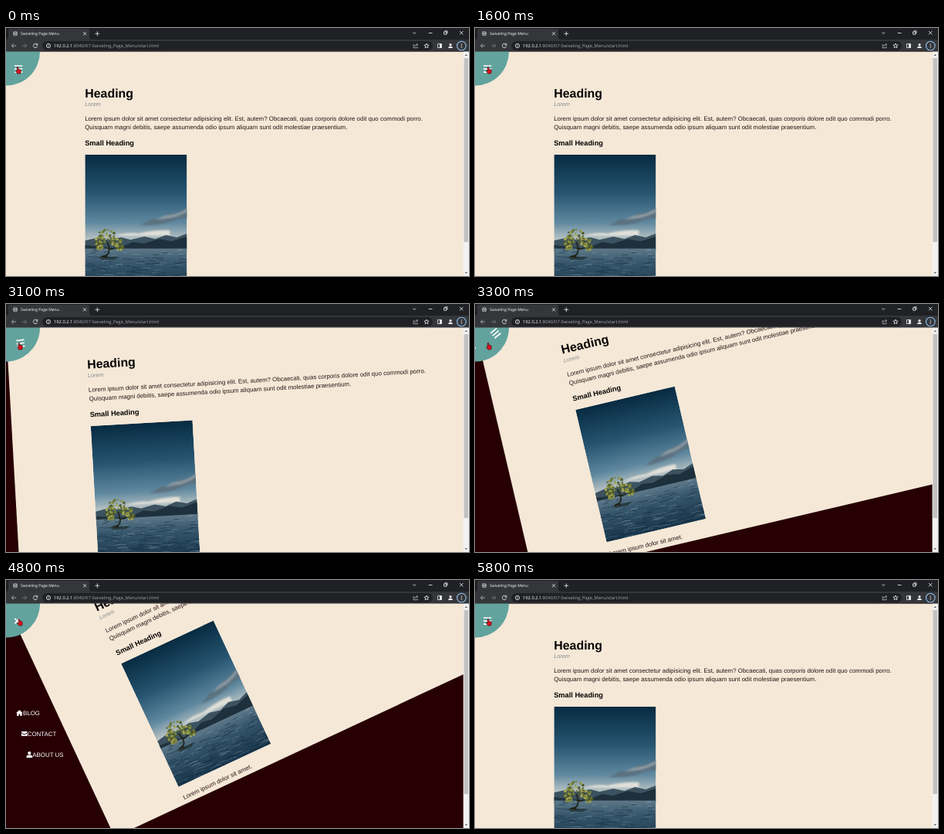
An HTML page for the animation above (5900 ms loop, 600 by 321 pixels).

```html
<!DOCTYPE html>
<html lang="en">
<head>
<meta charset="utf-8">
<title>Swiveling Page Menu</title>
<style>
  html, body { margin: 0; width: 100%; height: 100%; overflow: hidden; background: #270004; }
  svg { display: block; width: 600px; height: 321px; }
  text { font: 7.91px "Liberation Sans", Arial, sans-serif; text-rendering: geometricPrecision; white-space: pre; }
  .ui { font-family: "Open Sans", "Noto Sans", sans-serif; font-size: 5.75px; fill: #fff; }
  .line { fill: none; stroke: #e8eaed; stroke-width: .85; }
  .white { fill: none; stroke: #fff; stroke-width: 1.7; }
</style>
</head>
<body>
<svg viewBox="0 0 600 321">
  <defs>
    <linearGradient id="sky" x1="0" y1="0" x2="0" y2="1">
      <stop offset="0" stop-color="#072b41"/>
      <stop offset=".4" stop-color="#265470"/>
      <stop offset=".72" stop-color="#5f889f"/>
      <stop offset=".9" stop-color="#b9c3c4"/>
      <stop offset="1" stop-color="#cfcdc4"/>
    </linearGradient>
    <linearGradient id="lake" x1="0" y1="0" x2="0" y2="1">
      <stop offset="0" stop-color="#5d7889"/>
      <stop offset=".35" stop-color="#36566c"/>
      <stop offset="1" stop-color="#17354b"/>
    </linearGradient>
    <filter id="soft"><feGaussianBlur stdDeviation="1.2"/></filter>
    <clipPath id="frame"><path d="M0 0h132v176H0z"/></clipPath>
  </defs>

  <path fill="#270004" d="M0 30h600v291H0z"/>

  <g fill="#fff">
    <g class="item" data-reach="46">
      <path d="M13 172.3l4.4-4 4.4 4h-1.2v3.7h-2.3v-2.5h-1.8v2.5h-2.3v-3.7z"/>
      <text x="22" y="175">BLOG</text>
    </g>
    <g class="item" data-reach="66">
      <path d="M20 196h7.6v1.2l-3.8 2.6-3.8-2.6zM20 198.2l3.8 2.6 3.8-2.6v3.8H20z"/>
      <text x="27.7" y="202">CONTACT</text>
    </g>
    <g class="item" data-reach="76">
      <circle cx="30.3" cy="224" r="2.1"/>
      <path d="M26.4 230q0-3.4 2.6-3.4h2.6q2.6 0 2.6 3.4z"/>
      <text x="34.3" y="229">ABOUT US</text>
    </g>
  </g>

  <g id="page">
    <path fill="#f5e8d7" d="M0 30.6h593v333.4H0z"/>
    <text x="102.3" y="89.6" fill="#050303" style="font-size:15.9px;font-weight:bold">Heading</text>
    <text x="102.2" y="101" fill="#858b8e" style="font-size:7.3px;font-style:italic">Lorem</text>
    <g fill="#2a1214">
      <text x="102.2" y="119.8">Lorem ipsum dolor sit amet consectetur adipisicing elit. Est, autem? Obcaecati, quas corporis dolore odit quo commodi porro.</text>
      <text x="102.2" y="131.3">Quisquam magni debitis, saepe assumenda odio ipsum aliquam sunt odit molestiae praesentium.</text>
      <text x="102.2" y="358">Lorem ipsum dolor sit amet.</text>
    </g>
    <text x="102.2" y="152.3" fill="#050303" style="font-size:9.26px;font-weight:bold">Small Heading</text>
    <g transform="translate(102.4 164)" clip-path="url(#frame)">
      <path fill="url(#sky)" d="M0 0h132v122H0z"/>
      <g filter="url(#soft)">
        <path fill="#5c7280" d="M70 91q10-3 16-8 12 2 20-6 14-1 28-8v13q-14 0-24 5-12 5-40 4z"/>
        <path fill="#8c9aa2" d="M92 84q10-6 18-6t22-8v4q-14 7-22 8t-18 2z"/>
        <path fill="#e0dfd8" d="M34 106q18-6 36-4 20-5 40-4v7H34z"/>
      </g>
      <path fill="#3c5260" d="M0 111l14-3 16 2 17-3 12 3 18-4 14 3 14-5 14 3 13-5v24H0z"/>
      <path fill="#1e303c" d="M40 122l22-9 14 2 20-6 16 3 20-6v17H40z"/>
      <path fill="#22333c" d="M0 117l20 2 24 3H0z"/>
      <path fill="url(#lake)" d="M0 121.5h132V176H0z"/>
      <path id="glints" fill="none" stroke="#93aab8" stroke-width=".6" opacity=".5"/>
      <path id="ripples" fill="none" stroke="#0e2639" stroke-width="1" opacity=".5"/>
      <path fill="#1b2a26" opacity=".6" d="M17 132h26l-5 4H22z"/>
      <path fill="none" stroke="#20251a" stroke-width="1.8" d="M21 132q9-1 10-6t-2-13M29 121q8 3 13-3M29 132h-8"/>
      <g id="leaves"></g>
    </g>
  </g>

  <g id="dial">
    <circle cy="30.6" r="44" fill="#62a39e"/>
    <path class="white" d="M11 49h10.3M11 53.1h10.3M11 57.2h10.3"/>
    <path class="white" transform="rotate(80 0 30.6)" d="M11.4 49.9l6.4 6.4M17.8 49.9l-6.4 6.4"/>
  </g>

  <path fill="#f1f1f1" d="M592.6 30h8v291h-8z"/>
  <path fill="#c1c1c1" d="M593.5 39h5.5v238h-5.5z"/>
  <path fill="#606060" d="M594.6 36l1.7-2 1.7 2zM594.6 316l1.7 2 1.7-2z"/>

  <path fill="#202124" d="M0 0h600v15H0z"/>
  <path fill="#35363a" d="M0 15Q3 15 3 12V3Q3 1 5 1H106Q108 1 108 3V12Q108 15 111 15H600V30.6H0z"/>
  <rect x="47" y="17" width="506" height="12" rx="6" fill="#202124"/>
  <circle cx="12" cy="7.3" r="3" fill="#c4c7cb"/>
  <path fill="none" stroke="#35363a" stroke-width=".5" d="M9.2 6.3h5.6M9.2 8.5h5.6M12 4.3q-2.4 3 0 6q2.4-3 0-6"/>
  <text class="ui" x="19" y="9.3" style="font-size:5.1px">Swiveling Page Menu</text>
  <text class="ui" x="62" y="25.1">192.0.2.1<tspan fill="#a4a9ae">:8040/07-Swiveling_Page_Menu/start.html</tspan></text>
  <g class="line">
    <path d="M100 5.3l4 4M104 5.3l-4 4M115.5 7.3h5.6M118.3 4.5v5.6"/>
    <path d="M527.3 5.5l2 2 2-2M547.8 6.5h4.6M588 4l4.4 4.4M592.4 4L588 8.4M567.6 5h3.2v3.2h-3.2zM568.8 5V3.8h3.2V7h-1.2"/>
    <path stroke="#b5b8bc" d="M13 23H7.3M10 20.3L7.3 23l2.7 2.7"/>
    <path stroke="#7c7e82" d="M21 23h5.7M24 20.3l2.7 2.7-2.7 2.7"/>
    <path d="M40.2 21.2a2.7 2.7 0 1 0 .5 2.4M40.8 19.8v2.3h-2.3"/>
    <circle cx="55" cy="23" r="2.6"/>
    <path d="M55 22.6v1.8M55 21.2v.7"/>
    <path stroke="#aeb1b5" d="M529.5 21.5h-1.3v4.2h5v-1.5M529.8 24q.3-2.5 3.7-2.5M532 19.9l1.7 1.6-1.7 1.6"/>
    <path d="M545 20l.9 2 2.2.2-1.7 1.4.5 2.1-1.9-1.1-1.9 1.1.5-2.1-1.7-1.4 2.2-.2z"/>
    <path d="M559.5 20.5h5v5h-5z"/>
    <circle cx="590.3" cy="23" r="5.8" stroke="#8ec0f0" stroke-width="1.1"/>
  </g>
  <g fill="#f1f3f4">
    <path d="M562 20.5h2.5v5H562zM573.2 26q0-2.5 2.8-2.5t2.8 2.5z"/>
    <circle cx="576" cy="21.5" r="1.6"/>
    <circle cx="590.3" cy="20.8" r=".65"/>
    <circle cx="590.3" cy="23" r=".65"/>
    <circle cx="590.3" cy="25.2" r=".65"/>
  </g>

  <path id="hand" fill="#e0101c" stroke="#3a0508" stroke-width=".7" stroke-linejoin="round"
    d="M-1.9 -4.3q0-1 .8-1t.8 1v2.6q.9-.5 1.4.1.9-.4 1.4.3 1-.2 1.1.8v2.2q0 1.4-.9 2.8h-4q-.9-1.6-2.1-2.7-.7-1 .2-1.3.6-.1 1.3.6z"/>
</svg>
<script>
  const LOOP = 5900, STEP = 100, OPEN = 3035, CLOSE = 4894;
  const $ = id => document.getElementById(id);
  const items = document.querySelectorAll('.item');
  const ramp = (t, start, length) => Math.min(1, Math.max(0, (t - start) / length));
  const easeIn = x => x ** 1.7;
  const openness = t => ramp(t, OPEN, 500) - ramp(t, CLOSE, 500);

  let seed = 7;
  const random = () => (seed = seed * 16807 % 2147483647) / 2147483647;

  function waves(count) {
    let path = '';
    for (let i = 0; i < count; i++) {
      const depth = random();
      path += `M${random() * 140 - 8} ${123 + 53 * depth}q4 ${-1 - depth} ${6 + 10 * depth} 0`;
    }
    return path;
  }
  $('glints').setAttribute('d', waves(70));
  $('ripples').setAttribute('d', waves(90));

  // Leaf clusters: centre x, centre y, width, height.
  const clusters = [[28, 104, 11, 7], [20, 112, 7, 7], [41, 113, 9, 6], [18, 119, 5, 4], [45, 120, 5, 4]];
  const greens = ['#4d5729', '#6c7836', '#88903f', '#a7a857'];
  let leaves = '';
  for (let i = 0; i < 150; i++) {
    const [x, y, w, h] = clusters[i % clusters.length];
    const angle = random() * 2 * Math.PI, r = Math.sqrt(random());
    leaves += `<circle cx="${x + w * r * Math.cos(angle)}" cy="${y + h * r * Math.sin(angle)}" r="${0.8 + random()}" fill="${greens[i % 4]}"/>`;
  }
  $('leaves').innerHTML = leaves;

  function draw(now) {
    const t = Math.floor(now % LOOP / STEP) * STEP;
    $('page').setAttribute('transform', `rotate(${-25 * openness(t)} 0 30.6)`);
    $('dial').setAttribute('transform', `rotate(${-80 * openness(t - 20)} 0 30.6)`);
    // The menu waits for the page to swing before sliding in.
    const hidden = 1 - easeIn(ramp(t, OPEN + 300, 400)) + easeIn(ramp(t, CLOSE, 400));
    for (const item of items)
      item.setAttribute('transform', `translate(${-item.dataset.reach * hidden} 0)`);
    $('hand').setAttribute('transform', `translate(${16 + 2 * ramp(t, 0, 300)} 55) scale(.9)`);
    requestAnimationFrame(draw);
  }
  requestAnimationFrame(draw);
</script>
</body>
</html>
```
